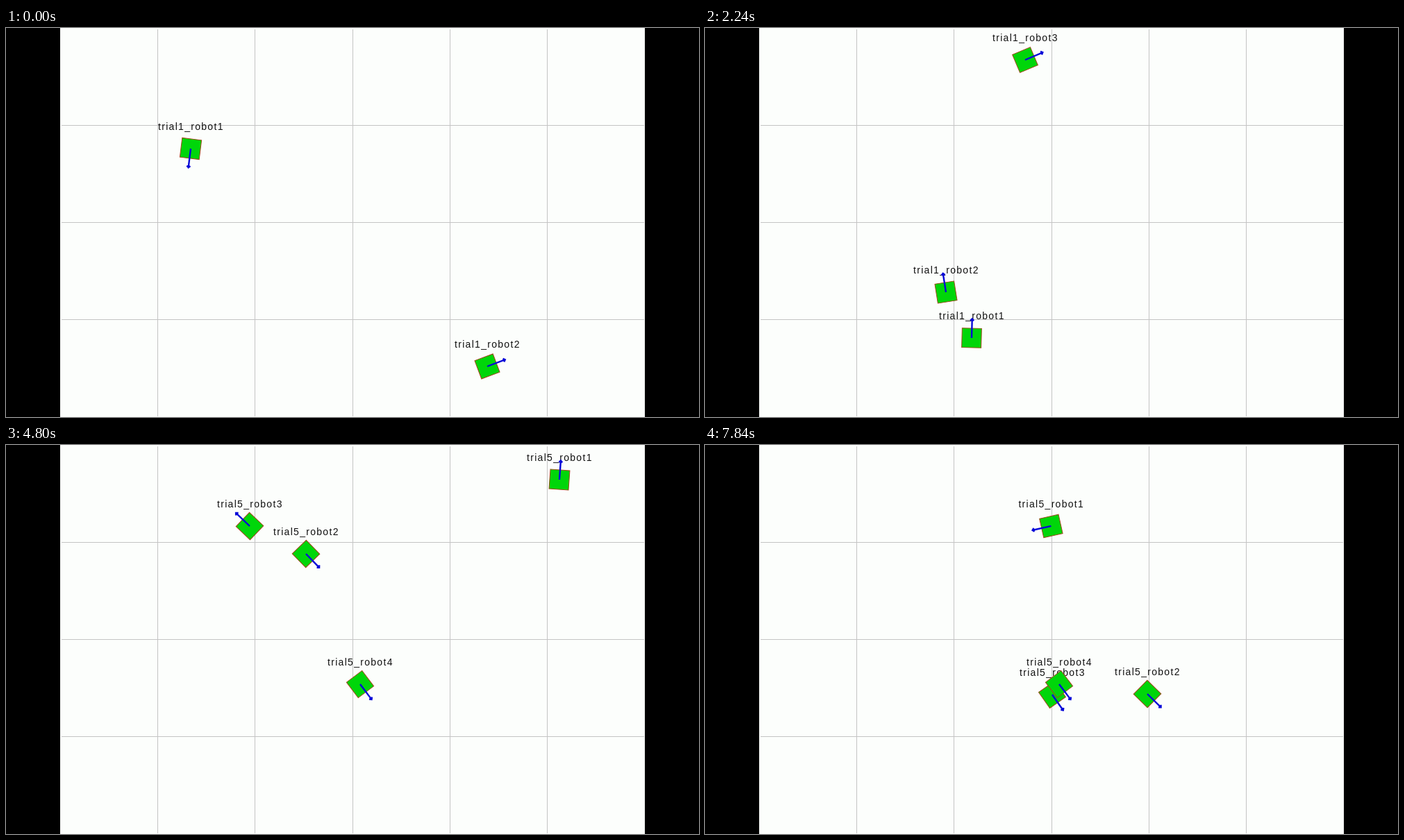
Write an HTML page with a canvas that moves like this. It is 998 px wide and 561 px high and loops after 8 s.

```html
<!DOCTYPE html>
<html lang="en">
<head>
<meta charset="utf-8">
<title>Robot trials</title>
<style>
  html, body { margin: 0; width: 100%; height: 100%; overflow: hidden; background: #000; }
  canvas { display: block; }
</style>
</head>
<body>
<canvas id="stage" width="998" height="561"></canvas>
<script>
const ctx = document.getElementById('stage').getContext('2d');
const LOOP = 8000, STEP = 80;
const SPEED = 0.6375; // pixels per ms
const CELL = 140.3, LEFT = 78.3;

const progress = (t, start, span) => Math.min(1, Math.max(0, (t - start) / span));
const shortest = angle => angle - 360 * Math.round(angle / 360);

// Actions take a pose and the time, and return the changed pose.
const turn = (start, heading, span = STEP) => (pose, t) => ({
  ...pose,
  heading: pose.heading + shortest(heading - pose.heading) * progress(t, start, span),
});

// Face the goal, then go straight to it at constant speed.
const drive = (start, x, y) => (pose, t) => {
  const dx = x - pose.x, dy = y - pose.y;
  const bearing = Math.atan2(dy, dx) * 180 / Math.PI;
  const u = progress(t, start, Math.hypot(dx, dy) / SPEED);
  return { ...turn(start - STEP, bearing)(pose, t), x: pose.x + dx * u, y: pose.y + dy * u };
};

const robot = (x, y, heading, ...actions) => t =>
  actions.reduce((pose, act) => act(pose, t), { x, y, heading });

const scenes = [
  { start: 0, trial: 1, robots: [
    robot(266, 174, 97, turn(240, 30, 160)),
    robot(693, 488, -20.5, turn(480, -140, 560)),
  ] },
  { start: 1200, trial: 1, robots: [
    robot(219, 280, 90, turn(1200, 84, 320)),
    robot(359, 421, -90, drive(1471, 359, 280)),
    robot(499, 280, 90),
    robot(639, 280, 90, turn(1200, 73, 320)),
  ] },
  { start: 2000, trial: 1, robots: [
    robot(384, 447, -130, turn(2000, -47, 480), drive(2480, 518, 303), drive(2870, 579, 280)),
    robot(347, 381, -140, turn(2000, -58, 480), drive(2480, 458, 209)),
    robot(461, 46, -60, turn(2000, 14, 480), drive(2480, 756, 120),
      turn(2880, 143), drive(3330, 457, 344)),
  ] },
  { start: 4320, trial: 5, robots: [
    robot(797, 50, -86, drive(7360, 498, 117)),
    robot(432, 157, 46, drive(5840, 637, 359)),
    robot(351, 117, -150, turn(4320, -136, 160), drive(4800, 288, 57), drive(6570, 500, 360)),
    robot(510, 345, 53),
  ] },
];

function drawField() {
  ctx.fillStyle = '#000';
  ctx.fillRect(0, 0, 998, 561);
  ctx.fillStyle = '#fcfefc';
  ctx.fillRect(78, 0, 842, 561);
  ctx.fillStyle = '#c4c4c4';
  for (let i = 1; i <= 5; i++) ctx.fillRect(Math.floor(LEFT + CELL * i), 2, 1, 558);
  for (let i = 1; i <= 3; i++) ctx.fillRect(80, Math.floor(CELL * i), 839, 1);
}

function drawRobot(label, { x, y, heading }) {
  ctx.font = '14px "Liberation Sans", Arial, sans-serif';
  ctx.letterSpacing = '1.3px';
  ctx.fillStyle = '#111';
  ctx.fillText(label, x - 47, y - 27);

  ctx.save();
  ctx.translate(x, y);
  ctx.rotate(heading * Math.PI / 180);
  ctx.fillStyle = '#00d60a';
  ctx.strokeStyle = '#a04a1c';
  ctx.lineWidth = 1;
  ctx.fillRect(-14, -14, 28, 28);
  ctx.strokeRect(-14, -14, 28, 28);

  ctx.strokeStyle = '#0808d8';
  ctx.lineWidth = 2.4;
  ctx.beginPath();
  ctx.moveTo(0, 0);
  ctx.lineTo(28, 0);
  ctx.moveTo(25, -2.5);
  ctx.lineTo(27.5, 0);
  ctx.lineTo(25, 2.5);
  ctx.stroke();
  ctx.restore();
}

function frame() {
  const t = Math.floor(performance.now() % LOOP / STEP) * STEP;
  const scene = scenes.filter(s => s.start <= t).pop();
  drawField();
  scene.robots.forEach((poseAt, i) =>
    drawRobot(`trial${scene.trial}_robot${i + 1}`, poseAt(t)));
  requestAnimationFrame(frame);
}
requestAnimationFrame(frame);
</script>
</body>
</html>
```
